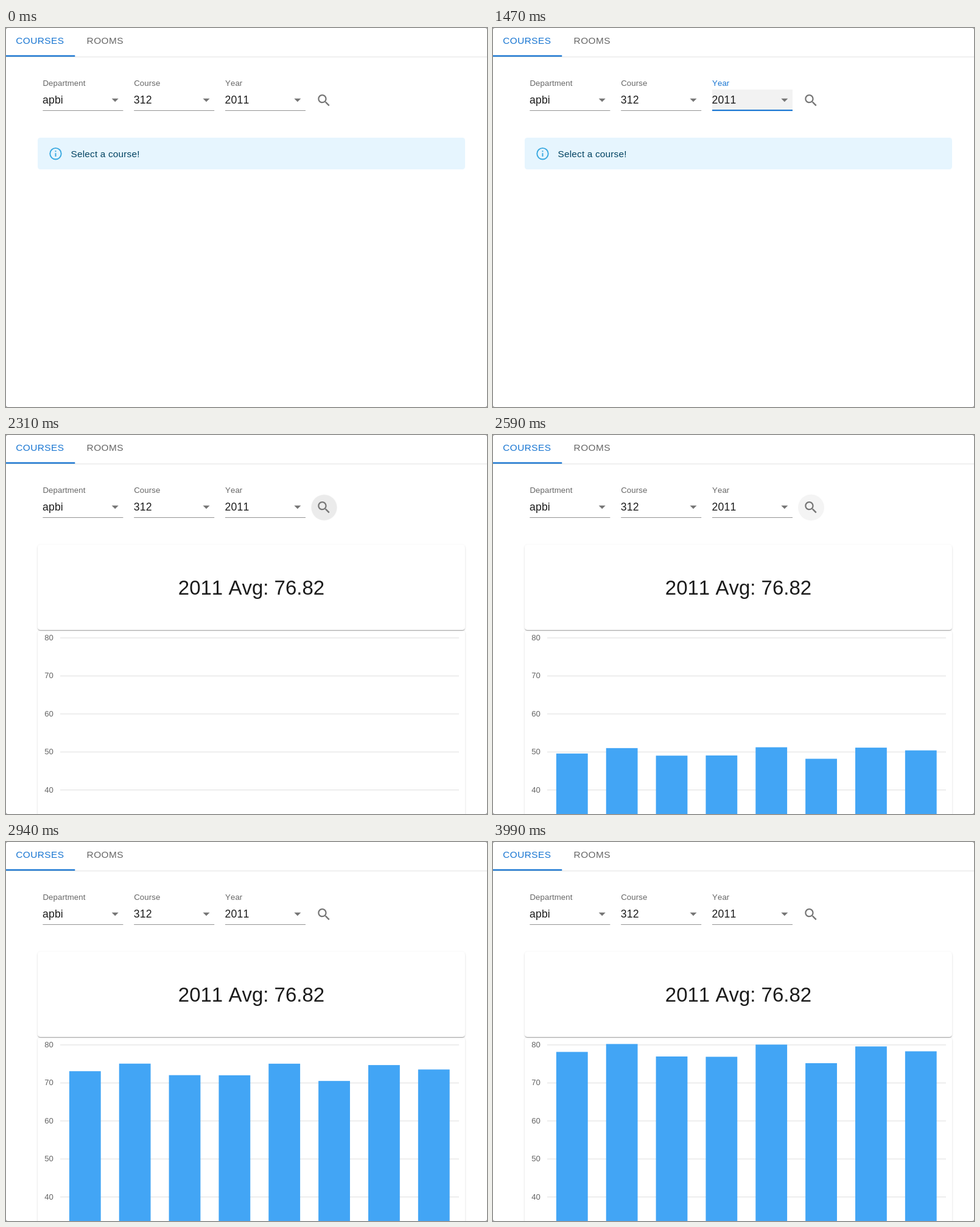
Animation of 790 by 622 pixels, one loop 4340 ms. Source, as an HTML page:

```html
<!DOCTYPE html>
<html lang="en">
<head>
<meta charset="utf-8">
<title>Courses</title>
<style>
/* One stepped clock in ms drives every state below. */
@property --t { syntax: "<number>"; inherits: true; initial-value: 0; }
@keyframes clock { from { --t: 0; } to { --t: 4340; } }

:root {
  animation: clock 4340ms steps(62) infinite;
  --in: clamp(0, (1390 - var(--t)) / 240, 1);
  --out: clamp(0, (2150 - var(--t)) / 220, 1);
  --focus: calc((1 - var(--in) * var(--in)) * var(--out) * var(--out));
  --focused: calc(clamp(0, var(--t) - 1150, 1) * clamp(0, 1925 - var(--t), 1));
  --hover: calc(clamp(0, (var(--t) - 1700) / 100, 1) * clamp(0, (2940 - var(--t)) / 150, 1));
  --ripple: clamp(0, min((var(--t) - 1890) / 140, (2590 - var(--t)) / 560), 1);
  --loaded: clamp(0, var(--t) - 2200, 1);
}
html, body { margin: 0; width: 100%; height: 100%; overflow: hidden; background: #fff; }
#stage { position: relative; width: 790px; height: 622px; overflow: hidden; }
svg { position: absolute; left: 0; top: 0; }
text { font-family: "Liberation Sans", Arial, sans-serif; font-kerning: none; }

.tab { font-size: 15.4px; letter-spacing: .44px; fill: #666; }
.tab.on { fill: #1976d2; }
.label { font-size: 13.2px; letter-spacing: .124px; fill: #666; }
.value { font-size: 17.6px; letter-spacing: .165px; fill: #1c1c1c; }
.active .label {
  fill: rgb(calc(102 - 77 * var(--focus)), calc(102 + 16 * var(--focus)), calc(102 + 108 * var(--focus)));
}
.fill { fill: #f2f2f2; opacity: var(--focused); }
.line { fill: #1976d2; transform: scaleX(var(--focus)); transform-origin: 426px 0; }
.hover { opacity: calc(.045 * var(--hover)); }
.ripple {
  opacity: calc(.035 * 2 * var(--ripple));
  transform: scale(clamp(.3, (var(--t) - 1900) / 350, 1));
  transform-origin: 522.5px 119px;
}
.alert { opacity: calc(1 - var(--loaded)); }
.alert text { font-size: 15.4px; letter-spacing: .165px; fill: #014361; }

.result { opacity: var(--loaded); }
.paper {
  position: absolute; left: 52px; width: 702px; border-radius: 4.4px; background: #fff;
  box-shadow: 0 2.2px 1.1px -1.1px rgba(0,0,0,.2), 0 1.1px 1.1px rgba(0,0,0,.14), 0 1.1px 3.3px rgba(0,0,0,.12);
}
.chart { top: 320px; height: 620px; }
.card { top: 180px; height: 140px; }
.avg { font-size: 33px; fill: #1c1c1c; }
.tick { font-size: 13.2px; fill: #666; text-anchor: end; }
.bar {
  --u: max(0, (3195 - 1.1 * var(--i) - var(--t)) / 1000);
  fill: #42a5f5;
  transform: scaleY(calc(1 - var(--u) * var(--u)));
  transform-origin: 0 831.5px;
}
</style>
</head>
<body>
<div id="stage">
  <svg width="790" height="622">
    <rect y="47" width="790" height="1" fill="#e2e2e2"/>
    <rect y="44.7" width="113.3" height="2.3" fill="#1976d2"/>
    <text class="tab on" x="16.2" y="26">COURSES</text>
    <text class="tab" x="132.6" y="26">ROOMS</text>
    <g id="fields"></g>
    <circle class="hover" cx="522.5" cy="119" r="21.5"/>
    <circle class="ripple" cx="522.5" cy="119" r="20.8"/>
    <path fill="#757575" transform="translate(509 105.7) scale(1.1)" d="M15.5 14h-.79l-.28-.27C15.41 12.59 16 11.11 16 9.5 16 5.91 13.09 3 9.5 3S3 5.91 3 9.5 5.91 16 9.5 16c1.61 0 3.09-.59 4.23-1.57l.27.28v.79l5 4.99L20.49 19l-4.99-5zm-6 0C7.01 14 5 11.99 5 9.5S7.01 5 9.5 5 14 7.01 14 9.5 11.99 14 9.5 14z"/>
    <g class="alert">
      <rect x="52" y="180" width="702" height="52" rx="4.4" fill="#e6f5fe"/>
      <circle cx="81.5" cy="206.3" r="9.2" fill="none" stroke="#38a8e0" stroke-width="1.9"/>
      <path d="M81.5 201.3v1.9M81.5 205.3v5.6" stroke="#38a8e0" stroke-width="1.9"/>
      <text x="106.6" y="212">Select a course!</text>
    </g>
  </svg>

  <div class="result">
    <div class="paper chart"></div>
    <div class="paper card"></div>
    <svg width="790" height="622">
      <text class="avg" x="282.8" y="262">2011 Avg: 76.82</text>
      <g id="plot"></g>
    </svg>
  </div>

  <svg width="790" height="622">
    <path fill="#8c8c8c" fill-rule="evenodd" d="M0 0H790V622H0ZM3 0A3 3 0 0 0 0 3V619A3 3 0 0 0 3 622H787A3 3 0 0 0 790 619V3A3 3 0 0 0 787 0Z"/>
  </svg>
</div>

<script>
const fields = [["Department", "apbi"], ["Course", "312"], ["Year", "2011"]];
const tops = [344.5, 331.5, 352, 352.5, 332.5, 363, 335.5, 343.5];
const base = 831.5;

const field = ([label, value], i) => {
  const x = 60.4 + 149.8 * i;
  const active = label === "Year";
  return `<g class="${active ? "active" : ""}">
    ${active ? `<rect class="fill" x="${x}" y="101" width="132" height="34.5"/>` : ""}
    <rect x="${x}" y="135" width="132" height="1" fill="#949494"/>
    ${active ? `<rect class="line" x="${x}" y="134" width="132" height="2.2"/>` : ""}
    <text class="label" x="${x}" y="95">${label}</text>
    <text class="value" x="${x - .4}" y="124">${value}</text>
    <path d="M${x + 113.3} 115.8h11l-5.5 5.5z" fill="#757575"/>
  </g>`;
};

const gridLine = (_, i) => {
  const y = 332.5 + 62.4 * i;
  return `<rect x="89" y="${y}" width="655" height="1" fill="#dedede"/>
    <text class="tick" x="77.8" y="${y + 4.5}">${80 - 10 * i}</text>`;
};

const bar = (top, i) =>
  `<rect class="bar" style="--i:${i}" x="${103.9 + 81.85 * i}" y="${top}" width="51.8" height="${base - top}"/>`;

document.getElementById("fields").innerHTML = fields.map(field).join("");
document.getElementById("plot").innerHTML =
  Array.from({ length: 5 }, gridLine).join("") + tops.map(bar).join("");
</script>
</body>
</html>
```
